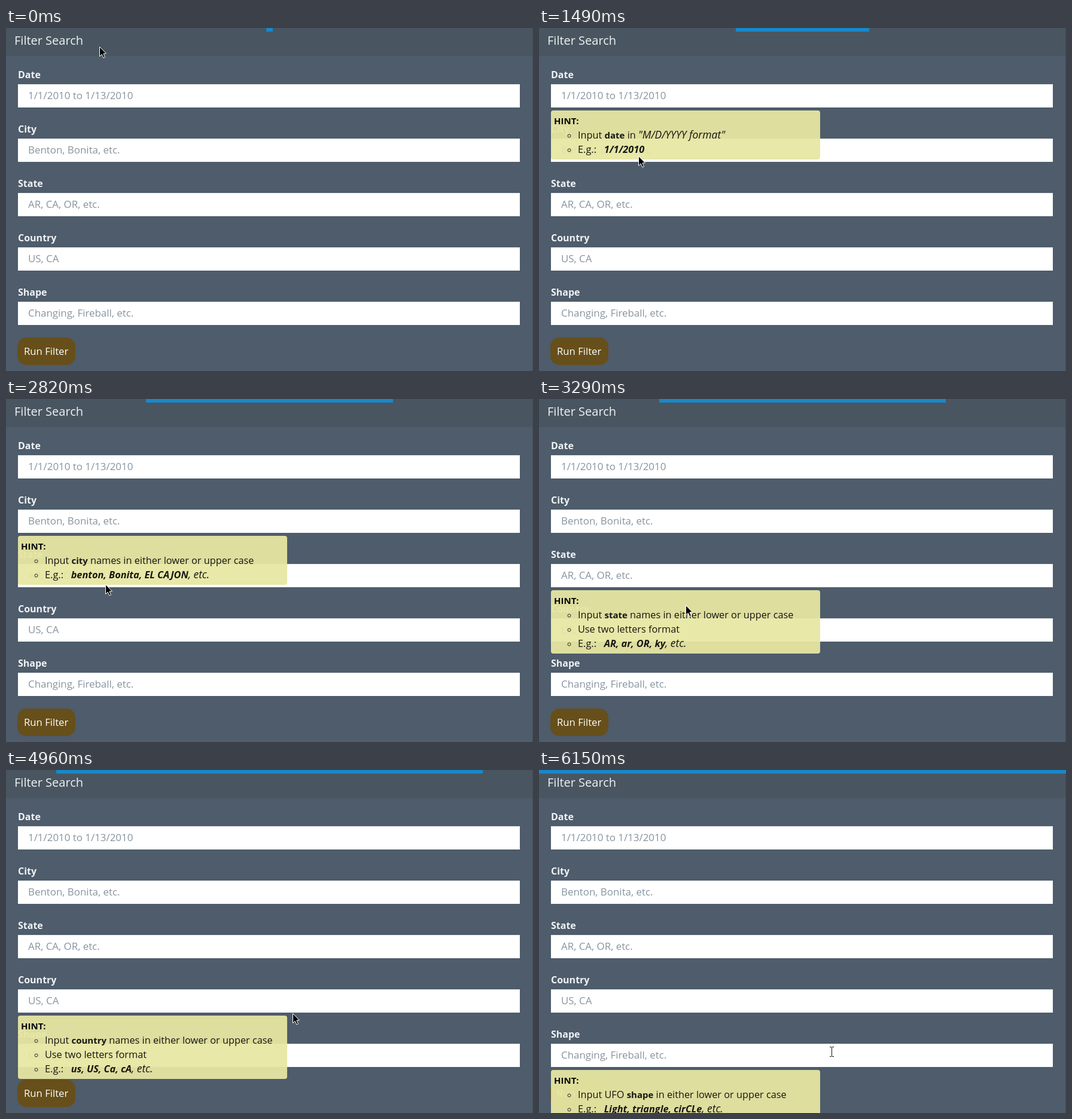
These frames come from a looping animation (881 px wide and 574 px high, 6220 ms). An HTML page with a canvas:

```html
<!DOCTYPE html>
<html lang="en">
<head>
<meta charset="utf-8">
<title>Filter Search</title>
<style>
html, body { margin: 0; width: 100%; height: 100%; overflow: hidden; background: #4e5c6b; }
canvas { display: block; width: 881px; height: 574px; }
</style>
</head>
<body>
<canvas id="stage"></canvas>
<script>
const W = 881, H = 574, LOOP = 6220, STEPS = 79, FADE = 150;
const canvas = document.getElementById('stage');
const ratio = window.devicePixelRatio || 1;
canvas.width = Math.round(W * ratio);
canvas.height = Math.round(H * ratio);
const ctx = canvas.getContext('2d');
ctx.scale(ratio, ratio);

const FAMILY = '"Open Sans", "Noto Sans", sans-serif';
const FONTS = {
  title: '20px ' + FAMILY,
  label: 'bold 16px ' + FAMILY,
  field: '16.9px ' + FAMILY,
  button: '500 16.7px ' + FAMILY,
  text: '16.3px ' + FAMILY,
  bold: 'bold 15px ' + FAMILY,
  italic: 'italic 17.5px ' + FAMILY,
  strong: 'italic bold 16.3px ' + FAMILY
};

const fields = [
  ['Date', '1/1/2010 to 1/13/2010'],
  ['City', 'Benton, Bonita, etc.'],
  ['State', 'AR, CA, OR, etc.'],
  ['Country', 'US, CA'],
  ['Shape', 'Changing, Fireball, etc.']
].map(([label, sample], i) => ({ label, sample, y: 94 + 91 * i }));

// A line is a list of [font, text] runs
const rule = (lead, word, rest) => [['text', lead], ['bold', word], ['text', rest]];
const example = (text, tail = ', etc.') =>
  [['text', 'E.g.:   '], ['strong', text], ['italic', tail]];
const CASES = 'in either lower or upper case';
const LETTERS = [['text', 'Use two letters format']];

const hints = [
  { from: 414, lines: [
    [...rule('Input ', 'date', ' in '), ['italic', '"M/D/YYYY format"']],
    example('1/1/2010', '')] },
  { from: 1570, lines: [
    rule('Input ', 'city', ' names ' + CASES),
    example('benton, Bonita, EL CAJON')] },
  { from: 2900, lines: [
    rule('Input ', 'state', ' names ' + CASES),
    LETTERS, example('AR, ar, OR, ky')] },
  { from: 4480, lines: [
    rule('Input ', 'country', ' names ' + CASES),
    LETTERS, example('us, US, Ca, cA')] },
  { from: 5080, lines: [
    rule('Input UFO ', 'shape', ' ' + CASES),
    example('Light, triangle, cirCLe')] }
].map((hint, i) => ({ ...hint, y: fields[i].y + 44, h: 34 + 24 * hint.lines.length }));

// Cursor stops: [time, x, y]
const stops = [
  [70, 157, 32], [540, 163, 105], [1490, 167, 215], [2820, 167, 311],
  [3910, 350, 393], [4370, 466, 410], [4600, 475, 400], [4960, 480, 408],
  [5220, 489, 471]
];

function cursorAt(t) {
  const i = stops.findIndex(s => s[0] > t);
  if (i < 1) return stops.at(i).slice(1);
  const [t0, x0, y0] = stops[i - 1], [t1, x1, y1] = stops[i];
  const p = (t - t0) / (t1 - t0);
  return [Math.round(x0 + (x1 - x0) * p), Math.round(y0 + (y1 - y0) * p)];
}

function rect(color, x, y, w, h, radius = 0) {
  ctx.fillStyle = color;
  ctx.beginPath();
  ctx.roundRect(x, y, w, h, radius);
  ctx.fill();
}

// Returns the x where the text ends
function write(text, x, y, font, color) {
  ctx.font = FONTS[font];
  ctx.fillStyle = color;
  ctx.fillText(text, x, y);
  return x + ctx.measureText(text).width;
}

function drawForm() {
  rect('#4e5c6b', 0, 0, W, H);
  rect('#495661', 0, 0, W, 47);
  rect('#414d59', 880, 0, 1, H);
  write('Filter Search', 14, 28, 'title', '#eff2f4');
  for (const f of fields) {
    write(f.label, 20, f.y - 10, 'label', '#eff2f5');
    rect('#ffffff', 20, f.y, 839, 39);
    rect('#e9ecef', 20, f.y, 839, 1);
    write(f.sample, 37, f.y + 25, 'field', '#87949f');
  }
  rect('#664f1a', 19, 518, 97, 46, 15);
  write('Run Filter', 30, 547, 'button', '#ffffff');
}

function drawHint(hint, t) {
  const shown = Math.min(1, (t - hint.from) / FADE);
  ctx.globalAlpha = 0.94 * shown;
  rect('#e7e7a3', 20, hint.y, 450, hint.h, 4);
  ctx.globalAlpha = shown;
  write('HINT:', 25, hint.y + 23, 'bold', '#080808');
  hint.lines.forEach((line, i) => {
    const y = hint.y + 47 + 24 * i;
    ctx.strokeStyle = '#222';
    ctx.lineWidth = 1;
    ctx.beginPath();
    ctx.arc(50.5, y - 4.5, 2.5, 0, Math.PI * 2);
    ctx.stroke();
    let x = 65;
    for (const [font, text] of line) x = write(text, x, y, font, '#161613');
  });
  ctx.globalAlpha = 1;
}

const arrow = new Path2D('M0 0V16L3.7 12.6L6.4 18.5L9 17.3L6.4 11.5L11 11.2Z');

function drawArrow(x, y) {
  ctx.save();
  ctx.translate(x - 0.5, y - 0.5);
  ctx.fillStyle = '#000';
  ctx.strokeStyle = '#fff';
  ctx.lineWidth = 1;
  ctx.fill(arrow);
  ctx.stroke(arrow);
  ctx.restore();
}

function drawBeam(x, y) {
  rect('#111', x, y - 7, 1, 15);
  for (const end of [y - 8, y + 8]) {
    rect('#111', x - 3, end, 3, 1);
    rect('#111', x + 1, end, 3, 1);
  }
}

function drawCursor(t, hint) {
  const [x, y] = cursorAt(t);
  const onHint = hint && x <= 470 && y >= hint.y && y <= hint.y + hint.h;
  const onField = fields.some(f => y >= f.y && y < f.y + 39);
  if (onField && !onHint) drawBeam(x, y);
  else drawArrow(x, y);
}

// Grows from the middle in even steps
function drawBar(t) {
  const step = Math.min(STEPS, Math.floor(t / 78.2 + 1.15));
  const half = W / 2 * step / STEPS;
  const left = Math.round(W / 2 - half);
  rect('#1988c9', left, 0, Math.round(W / 2 + half) - left, 6);
}

function draw(now) {
  const t = now % LOOP;
  const hint = hints.findLast(h => t >= h.from);
  drawForm();
  if (hint) drawHint(hint, t);
  drawCursor(t, hint);
  drawBar(t);
}

const start = performance.now();
function tick() {
  draw(performance.now() - start);
  requestAnimationFrame(tick);
}
tick();
</script>
</body>
</html>
```
